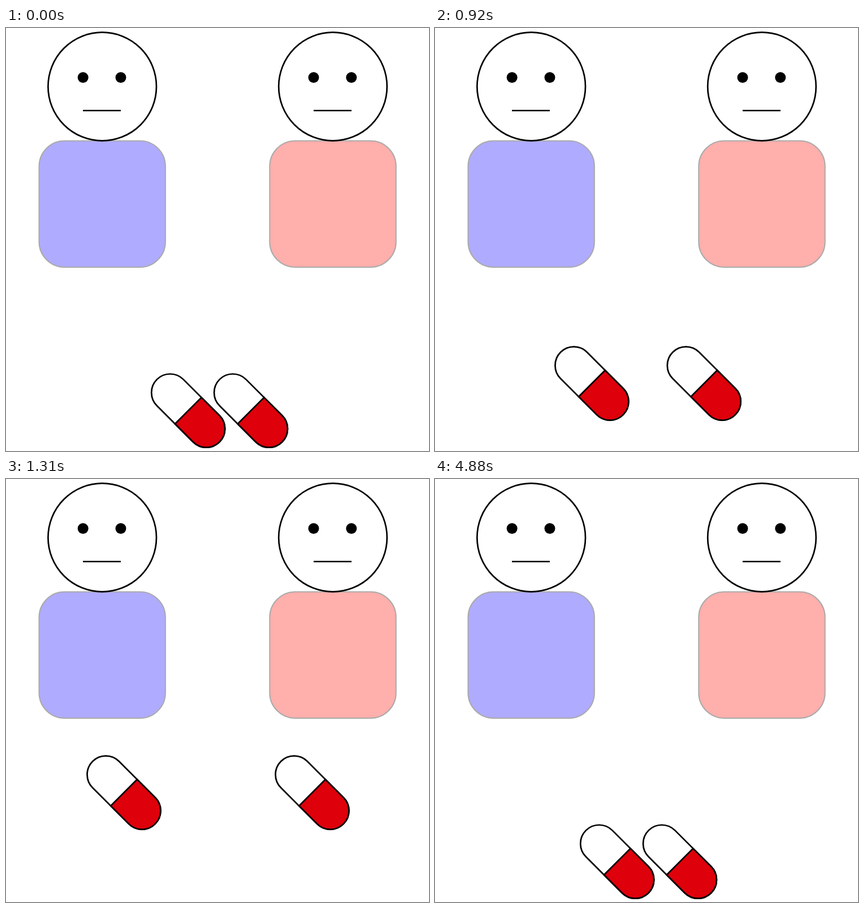
These frames come from a looping animation (748 px wide and 748 px high, 5070 ms). An HTML page:

```html
<!DOCTYPE html>
<html lang="en">
<head>
<meta charset="utf-8">
<title>Two patients, two pills</title>
<style>
  html, body { margin: 0; width: 100%; height: 100%; overflow: hidden; background: #fff; }
  svg { display: block; width: 100vw; height: 100vh; }
</style>
</head>
<body>
<svg viewBox="0 0 748 748" fill="none" stroke="#000" stroke-width="2.7">
  <defs>
    <g id="face">
      <circle cx="170.2" cy="103.5" r="95.8"/>
      <g fill="#000" stroke="none">
        <circle cx="136.2" cy="87.5" r="9.5"/>
        <circle cx="203" cy="87.5" r="9.5"/>
      </g>
    </g>
    <rect id="body" x="58.5" y="199.5" width="223.4" height="223.4" rx="45" stroke="#aaa" stroke-width="2"/>
    <g id="pill" transform="rotate(45)">
      <rect x="-78.2" y="-33" width="156.4" height="66" rx="33" fill="#fff"/>
      <path d="M0-33H45.2A33 33 0 0 1 45.2 33H0Z" fill="#de000b"/>
    </g>
  </defs>
  <use href="#body" fill="#afabff"/>
  <use href="#body" x="407.8" fill="#ffafac"/>
  <use href="#face"/>
  <use href="#face" x="407.8"/>
  <path class="mouth"/>
  <path class="mouth"/>
  <use class="pill" href="#pill"/>
  <use class="pill" href="#pill"/>
</svg>
<script>
const LOOP = 5070, RESET = 4880;
// The pills move in uneven ticks, the mouths in even ones.
const ticks = [680, 720, 770, 800, 840, 880, 920, 970, 1010, 1040, 1080, 1120, 1150, 1190,
  1230, 1280, 1320, 1360, 1390, 1430, 1480];
const people = [
  { from: 322.2, to: 170.2, mouthX: 136, bend: [14, -14] },
  { from: 433, to: 578, mouthX: 544, bend: [14, 14] }
];
const mouths = document.querySelectorAll('.mouth');
const pills = document.querySelectorAll('.pill');

const progress = (t, start, end) => Math.min(1, Math.max(0, (t - start) / (end - start)));
const mix = (a, b, p) => a + (b - a) * p;

function draw(now) {
  let t = now % LOOP;
  if (t >= RESET) t = 0;
  const tick = ticks.findLast(s => s <= t) ?? 0;
  const move = progress(tick, 686, 1480);
  const mood = progress(Math.floor(t / 40) * 40, 1690, 2000);

  people.forEach(({ from, to, mouthX, bend }, i) => {
    pills[i].setAttribute('transform', `translate(${mix(from, to, move)} ${mix(676.7, 513.5, move)})`);
    const [a, b] = bend.map(d => 146 + d * mood);
    mouths[i].setAttribute('d', `M${mouthX} 146C${mouthX + 22.3} ${a} ${mouthX + 44.7} ${b} ${mouthX + 67} 146`);
  });
}

const start = performance.now();
function loop() {
  draw(performance.now() - start);
  requestAnimationFrame(loop);
}
loop();
</script>
</body>
</html>
```
